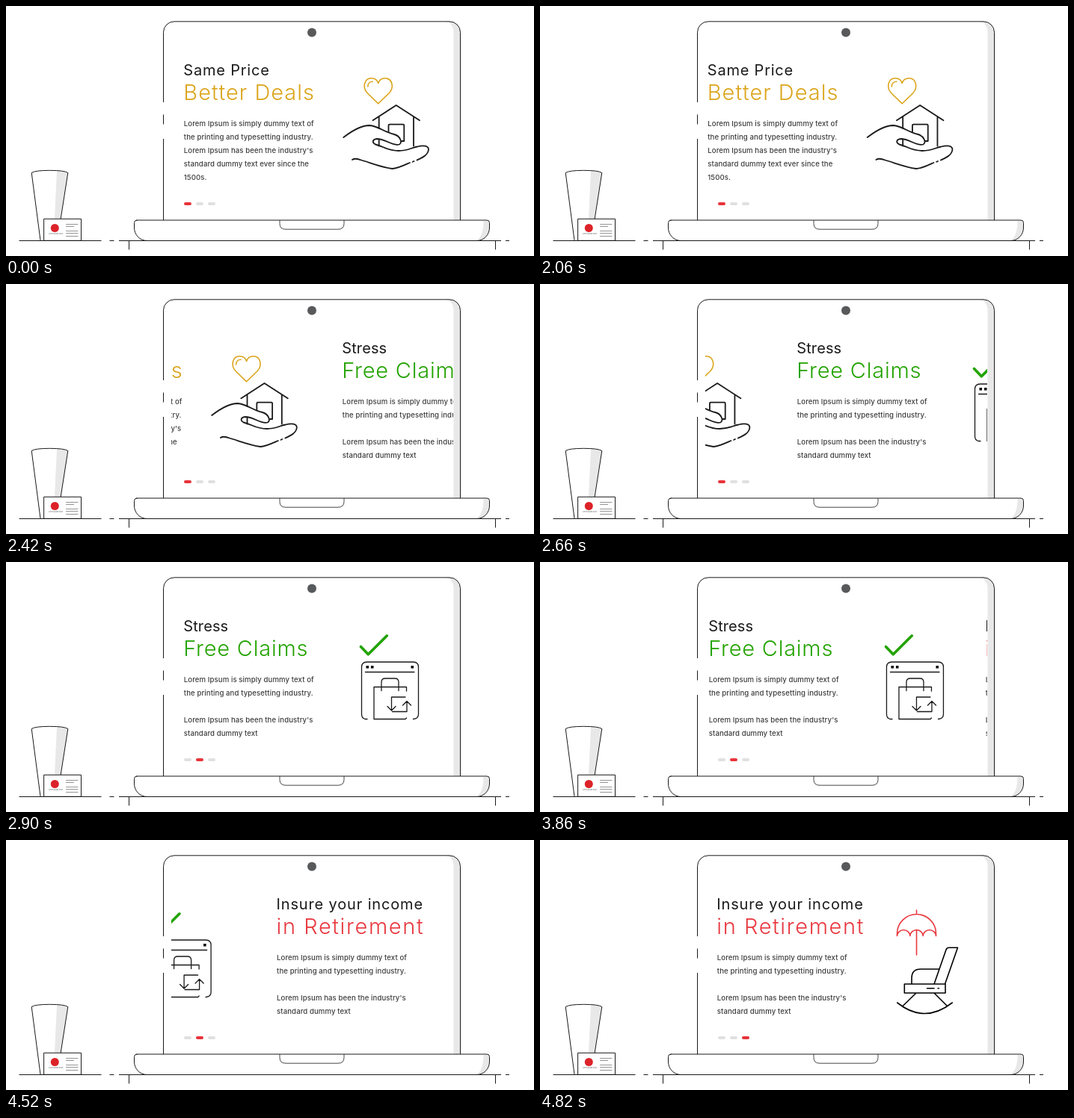
Recreate the animation shown at these times as an HTML page. Size 706 px wide and 335 px high, loop 6.29 s.

```html
<!DOCTYPE html>
<html lang="en">
<head>
<meta charset="utf-8">
<title>Laptop slideshow</title>
<style>
  html, body { margin: 0; width: 100%; height: 100%; overflow: hidden; background: #fff; }
  svg { display: block; width: 706px; height: 335px; font-family: Inter, "Open Sans", sans-serif; font-optical-sizing: none; }
  path, .line { fill: none; stroke: #1a1a1a; stroke-linecap: round; stroke-linejoin: round; }
  .shade { fill: #e8e8e8; stroke: none; }
  .lead { font-size: 20px; fill: #1a1a1a; }
  .head { font-size: 29px; font-weight: 300; }
  .body { font-size: 9.6px; font-weight: 500; letter-spacing: .09px; fill: #3c3c3c; }
  .thick path { stroke-width: 1.8; }
  .thin path { stroke-width: 1.3; }
  .chair path { stroke: #000; stroke-width: 1.6; }
  .umbrella path { stroke: #e8383f; stroke-width: 1.6; }
</style>
</head>
<body>
<svg viewBox="0 0 706 335">
  <defs><clipPath id="screen"><rect x="221" y="60" width="377" height="195"/></clipPath></defs>

  <!-- Cup and card -->
  <path class="shade" d="M68 221 Q78 221 83 224 L73.200 285 H65Z"/>
  <path d="M46 314 L34.200 223.500 Q39 220.300 58.500 220.300 T82.800 223.500 L73.200 285"/>
  <rect class="line" x="51" y="285.300" width="49.500" height="29" style="fill:#fff"/>
  <circle cx="65.300" cy="297.500" r="5.500" fill="#dc2329"/>
  <text x="56.800" y="305.800" font-size="2.200" fill="#555">Lorem ipsum dolor</text>
  <path stroke-width=".7" style="stroke:#666" d="M80.500 292.500H96M80.500 295.500H90.500M80.500 301.500H96M80.500 304.500H96M80.500 308.500H96"/>

  <!-- Table -->
  <path style="stroke-linecap:butt" d="M17.500 314.500H127.500M138.500 314.500H144.500M151 314.500H662M668 314.500H673M164.500 314.500V326.500M654.500 314.500V326.500"/>

  <!-- Laptop -->
  <path class="shade" d="M588 21H593A14.500 14.500 0 0 1 607.500 35.500V287H598.500V34Q598 23 588 21Z"/>
  <path style="stroke-linecap:butt" d="M210.500 287V178M210.500 158.500V145.500M210.500 129V35.300A14.500 14.500 0 0 1 225 20.800H593A14.500 14.500 0 0 1 607.500 35.300V287"/>
  <circle cx="409" cy="35.500" r="6" fill="#58595b"/>
  <path class="shade" d="M638.500 288H643Q646.500 288 646.500 291V297A17 17 0 0 1 629.500 314Q638.500 308 638.500 288Z"/>
  <path d="M175 287H643Q646.500 287 646.500 290.500V297A17 17.500 0 0 1 629.500 314.500H188.500A17 17.500 0 0 1 171.500 297V290.500Q171.500 287 175 287Z"/>
  <path stroke-width=".8" d="M366 287.500V291.500Q366 299.200 374 299.200H444Q452 299.200 452 291.500V287.500"/>

  <g id="dots"></g>

  <g clip-path="url(#screen)">
    <g class="slide">
      <g class="thick">
        <path style="stroke:#dba51c;stroke-width:1.6" d="M497.800 130.800L483.500 117C476 109 479 97 488.500 96.800C493 96.800 496.500 99.500 497.800 103.500C499 99.500 502.500 96.800 507 96.800C516.500 97 519.500 109 512 117ZM483.800 108C483.800 104 486.500 101.300 490.300 101.300"/>
        <path d="M490.500 153.300L521.700 133L553 153.300M498.700 148.500V164M498.700 179V187.500M545 148.500V187.500M511.500 168.500V160Q511.500 158.700 513 158.700H531Q532.300 158.700 532.300 160V181H529"/>
        <path d="M451.300 176C463 167 475 160 486 160C498 161 506 169 519 172C527 174 530.500 183 526 185.500C516 188 508 178 496 178C490 178.500 489 183 494 185.500C505 188 510 194 525 194C537 194 542 190 550 188.500C558 186.500 565 187 565 192.500C564 200 557 203 549.500 206.500M545.500 208L543.800 208.800M540 210C531 214 523 218 516.500 218C502 216 490 211 475 206.500C470 204.500 466 204 463 206"/>
      </g>
    </g>
    <g class="slide">
      <g class="thin">
        <path style="stroke:#23a300;stroke-width:3.6" d="M474.500 113.500L484.300 123.800L509.300 98.800"/>
        <path d="M483 210.500H480Q475.500 209 475.500 204V141Q475.500 134 482.500 134H544.500Q551.500 134 551.500 141V204Q551.500 210 544.500 210.500M480.500 147.500H546"/>
        <path d="M535.500 173V167.500H492V210.500H534L535.500 209M502 172.500V161Q502 156 507 156H520Q525 156 525 161V172.500"/>
        <path d="M534 181H515.500V198.500M510 193.500L515.500 199L521 193.500M516.500 200.500H536V187M530.500 192L536 186.500L541.500 192"/>
        <path style="fill:#000;stroke:none" d="M481.500 139h3.500v3.500h-3.500zM488 139h3.500v3.500h-3.500zM541.500 139h3.500v3.500h-3.500z"/>
      </g>
    </g>
    <g class="slide">
      <g class="umbrella">
        <path d="M503.500 94V99M477.500 128.500V125.500A26 26 0 0 1 529.500 125.500V128.500M477.500 128.500a8.670 8.300 0 0 1 17.330 0a8.670 8.300 0 0 1 17.330 0a8.670 8.300 0 0 1 17.330 0M503.500 120.500V154"/>
      </g>
      <g class="chair">
        <path d="M527 193L543 147Q544 144.300 547 144.300H558.500L541.500 193M497 193V185Q497 173 509 173H534M487.300 193H542V205H487.300ZM517.500 198.800H527M532 198.800H533.500M503 205L485 222.500M527 205L544.500 222.500M477.700 218Q514 247 551.300 218"/>
      </g>
    </g>
  </g>
</svg>
<script>
const NS = "http://www.w3.org/2000/svg";
const LOOP = 6290, STEP = 30, SWITCHES = [2900, 4820];

// Each track lists [time, horizontal offset] points joined by straight lines.
const slides = [
  { lead: "Same Price", head: "Better Deals", color: "#dba51c", x: 237.3, spacing: [.8, 1],
    body: ["Lorem Ipsum is simply dummy text of", "the printing and typesetting industry.",
           "Lorem Ipsum has been the industry's", "standard dummy text ever since the", "1500s."],
    track: [[2030, 0], [2900, -393]] },
  { lead: "Stress", head: "Free Claims", color: "#23a300", x: 237.3, spacing: [.1, .75],
    body: ["Lorem Ipsum is simply dummy text of", "the printing and typesetting industry.", "",
           "Lorem Ipsum has been the industry's", "standard dummy text"],
    track: [[2030, 384], [2420, 212], [2900, 0], [3830, 0], [4820, -398]] },
  { lead: "Insure your income", head: "in Retirement", color: "#e8383f", x: 236.3, spacing: [.85, 1.6],
    body: ["Lorem Ipsum is simply dummy text of", "the printing and typesetting industry.", "",
           "Lorem Ipsum has been the industry's", "standard dummy text"],
    track: [[3830, 368], [3860, 359], [4250, 238], [4820, 0]] }
];

function add(parent, tag, attributes, text = "") {
  const node = document.createElementNS(NS, tag);
  for (const name in attributes) node.setAttribute(name, attributes[name]);
  node.textContent = text;
  return parent.appendChild(node);
}

const groups = [...document.querySelectorAll(".slide")];
slides.forEach(({ lead, head, color, x, spacing, body }, i) => {
  add(groups[i], "text", { class: "lead", x, y: 93, "letter-spacing": spacing[0] }, lead);
  add(groups[i], "text", { class: "head", x, y: 126.3, fill: color, "letter-spacing": spacing[1] }, head);
  body.forEach((line, row) => add(groups[i], "text", { class: "body", x: x + .5, y: 161 + 18 * row }, line));
});

const dotBox = document.getElementById("dots");
const dots = slides.map((_, i) =>
  add(dotBox, "rect", { x: 238 + 16 * i, y: 263, width: 10, height: 4, rx: 2 }));

function offsetAt(track, t) {
  if (t <= track[0][0]) return track[0][1];
  for (let i = 1; i < track.length; i++) {
    const [t0, x0] = track[i - 1], [t1, x1] = track[i];
    if (t <= t1) return x0 + (x1 - x0) * (t - t0) / (t1 - t0);
  }
  return track[track.length - 1][1];
}

const start = performance.now();

function draw() {
  const time = (performance.now() - start) % LOOP;
  const stepped = Math.floor((time - 20) / STEP) * STEP + 20;
  const active = SWITCHES.filter(t => stepped >= t).length;
  slides.forEach(({ track }, i) => {
    groups[i].setAttribute("transform", `translate(${offsetAt(track, stepped)})`);
    dots[i].setAttribute("fill", i === active ? "#e8333a" : "#e0e0e0");
  });
  requestAnimationFrame(draw);
}
draw();
</script>
</body>
</html>
```
